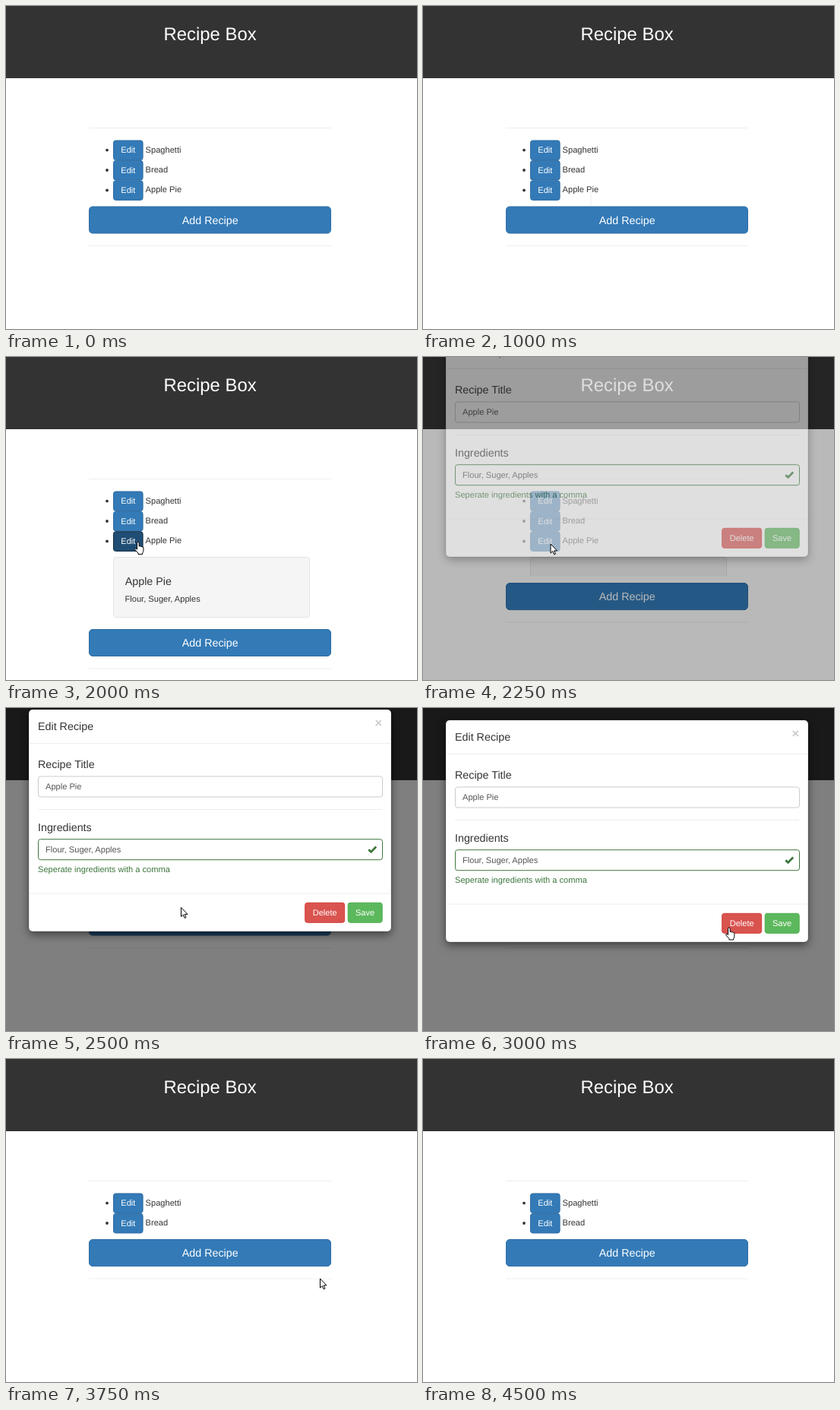
Write an HTML page that moves like this. It is 541 px wide and 425 px high and loops after 5250 ms.

```html
<!DOCTYPE html>
<html lang="en">
<head>
<meta charset="utf-8">
<title>Recipe Box</title>
<style>
  html, body { margin: 0; width: 100%; height: 100%; overflow: hidden; background: #fff; }
  svg { display: block; width: 541px; height: 425px; }
  text { font: 11.1px "Liberation Sans", Arial, sans-serif; fill: #333; text-rendering: geometricPrecision; }
  .big { font-size: 14.3px; }
  .title { font-size: 23.9px; }
  .mid { text-anchor: middle; }
  .white { fill: #fff; }
  .btn { fill: #337ab7; stroke: #2e6da4; }
  .hover { fill: #286090; stroke: #204d74; }
  .pressed { fill: #204d74; stroke: #122b40; }
  .line { fill: none; stroke: #eee; }
  .field { fill: #fff; stroke: #ccc; }
  .value { fill: #555; }
  .valid { stroke: #3c763d; }
  .help { fill: #3c763d; }
  .cursor { fill: #fff; stroke: #000; stroke-linejoin: round; }
</style>
</head>
<body>
<svg viewBox="0 0 541 425">
  <defs>
    <clipPath id="fold"><rect id="foldBox" x="130" y="263" width="290" height="0"/></clipPath>
  </defs>

  <rect width="541" height="95" fill="#333"/>
  <text class="title white mid" x="268.6" y="44.6">Recipe Box</text>
  <path class="line" d="M109 160.5H428"/>
  <g id="list"></g>

  <g clip-path="url(#fold)">
    <rect x="141.5" y="263.5" width="258" height="79" rx="3" fill="#f5f5f5" stroke="#e3e3e3"/>
    <text class="big" x="156.7" y="300">Apple Pie</text>
    <text x="156.5" y="322">Flour, Suger, Apples</text>
  </g>

  <g id="add">
    <rect id="addBox" class="btn" x="109.5" y="264" width="318" height="35" rx="4.5"/>
    <text class="big white mid" x="268.7" y="286.8">Add Recipe</text>
    <path class="line" d="M109 315.5H428"/>
  </g>

  <rect id="shade" width="541" height="425"/>
  <g id="modal">
    <rect x="30" y="16" width="477" height="292" rx="5" fill="#fff" stroke="#000" stroke-opacity=".2"
      style="filter:drop-shadow(0 4px 6px rgba(0,0,0,.5))"/>
    <text class="big" x="42" y="42.8">Edit Recipe</text>
    <text x="485.5" y="39.3" style="font-size:16.4px;font-weight:bold;fill:#ccc">×</text>
    <path class="line" d="M30.5 60.5H506.5M42 147.5H495M30.5 258H506.5"/>
    <text class="big" x="42" y="93.4">Recipe Title</text>
    <rect class="field" x="42.5" y="104" width="453" height="27" rx="3"/>
    <text class="value" x="52" y="121.2">Apple Pie</text>
    <text class="big" x="42" y="176">Ingredients</text>
    <rect class="field valid" x="42.5" y="186.7" width="453" height="27" rx="3"/>
    <text class="value" x="52" y="204">Flour, Suger, Apples</text>
    <path d="M477.3 200.4L480.6 203.4 487.2 196.6" fill="none" stroke="#3c763d" stroke-width="2.8"/>
    <text class="help" x="42" y="229.8">Seperate ingredients with a comma</text>
    <rect id="delete" x="393.7" y="270.3" width="52" height="26" rx="3" stroke="#d43f3a"/>
    <text class="white mid" x="419.7" y="287.3">Delete</text>
    <rect x="450.2" y="270.3" width="45" height="26" rx="3" fill="#5cb85c" stroke="#4cae4c"/>
    <text class="white mid" x="472.6" y="287.3">Save</text>
  </g>

  <path id="cursor" class="cursor"/>
</svg>
<script>
const $ = id => document.getElementById(id);
const LOOP = 5250, STEP = 250, ROW = 26.4;

$('list').innerHTML = ['Spaghetti', 'Bread', 'Apple Pie'].map((name, i) => `
  <g id="row${i}" transform="translate(0 ${i * ROW})">
    <circle cx="133" cy="189.6" r="1.9" fill="#333"/>
    <rect class="btn" x="141.5" y="177" width="38.6" height="25.6" rx="3"/>
    <text class="white mid" x="160.8" y="193.3">Edit</text>
    <text x="183.6" y="192.6">${name}</text>
  </g>`).join('');
const lastEdit = $('row2').querySelector('rect');

const cursors = {
  arrow: 'M.5 .5V12.6L3.2 10 5.2 14.4 7 13.6 5.1 9.4H9Z',
  hand: 'M3.6 10V1.8a1.3 1.3 0 0 1 2.6 0V6q1.2-.7 2.1.4 1.2-.6 2 .5 1.6-.4 1.6 1.2V11.6q0 2-1.2 3.4V16.5H5V15L.8 10.4q-.6-1.7 1-1.7Z',
  beam: 'M-1.5 0H1.5M0 0V16M-1.5 16H1.5',
};

// Each cue changes part of the state from its time on.
const cues = [
  [0, { shift: 0, lift: 0, fade: 0, add: '', edit: '', del: '#d9534f', items: 3, cursor: null }],
  [250, { cursor: ['arrow', 414, 390] }],
  [500, { cursor: ['beam', 221, 245], add: 'hover' }],
  [750, { add: '' }],
  [1250, { shift: 46 }],
  [1500, { shift: 94.5, cursor: ['arrow', 236, 238] }],
  [1750, { cursor: ['beam', 172, 287] }],
  [2000, { cursor: ['hand', 169, 243], edit: 'pressed' }],
  [2250, { cursor: ['arrow', 167.5, 245.5], edit: '', shift: 33.6, fade: .55, lift: 45 }],
  [2500, { cursor: ['arrow', 230, 262], shift: 0, fade: 1, lift: 14 }],
  [2750, { cursor: ['arrow', 350, 285], lift: 1 }],
  [3000, { cursor: ['hand', 398, 288.5], lift: 0 }],
  [3250, { del: '#c9302c' }],
  [3500, { del: '#ac2925' }],
  [3750, { cursor: ['arrow', 413, 288.5], fade: 0, items: 2, shift: -ROW }],
  [4000, { cursor: ['arrow', 396, 286] }],
  [4250, { cursor: ['arrow', 271, 398] }],
  [4500, { cursor: null }],
];

const set = (node, attrs) => {
  for (const key in attrs) node.setAttribute(key, attrs[key]);
};

function draw(time) {
  const s = Object.assign({}, ...cues.filter(cue => cue[0] <= time).map(cue => cue[1]));
  set($('row2'), { visibility: s.items > 2 ? 'visible' : 'hidden' });
  set(lastEdit, { class: 'btn ' + s.edit });
  set($('foldBox'), { height: Math.max(0, s.shift - 8) });
  set($('add'), { transform: `translate(0 ${s.shift})` });
  set($('addBox'), { class: 'btn ' + s.add });
  set($('shade'), { opacity: s.fade / 2 });
  set($('modal'), { opacity: s.fade, transform: `translate(0 ${-s.lift})` });
  set($('delete'), { fill: s.del });
  const [kind, x, y] = s.cursor || ['', 0, 0];
  set($('cursor'), {
    d: cursors[kind] || '',
    transform: `translate(${x} ${y})`,
    style: kind === 'beam' ? 'stroke:#eee' : '',
  });
}

let shown = -1;
function tick() {
  const step = Math.floor(performance.now() % LOOP / STEP);
  if (step !== shown) draw((shown = step) * STEP);
  requestAnimationFrame(tick);
}
tick();
</script>
</body>
</html>
```
